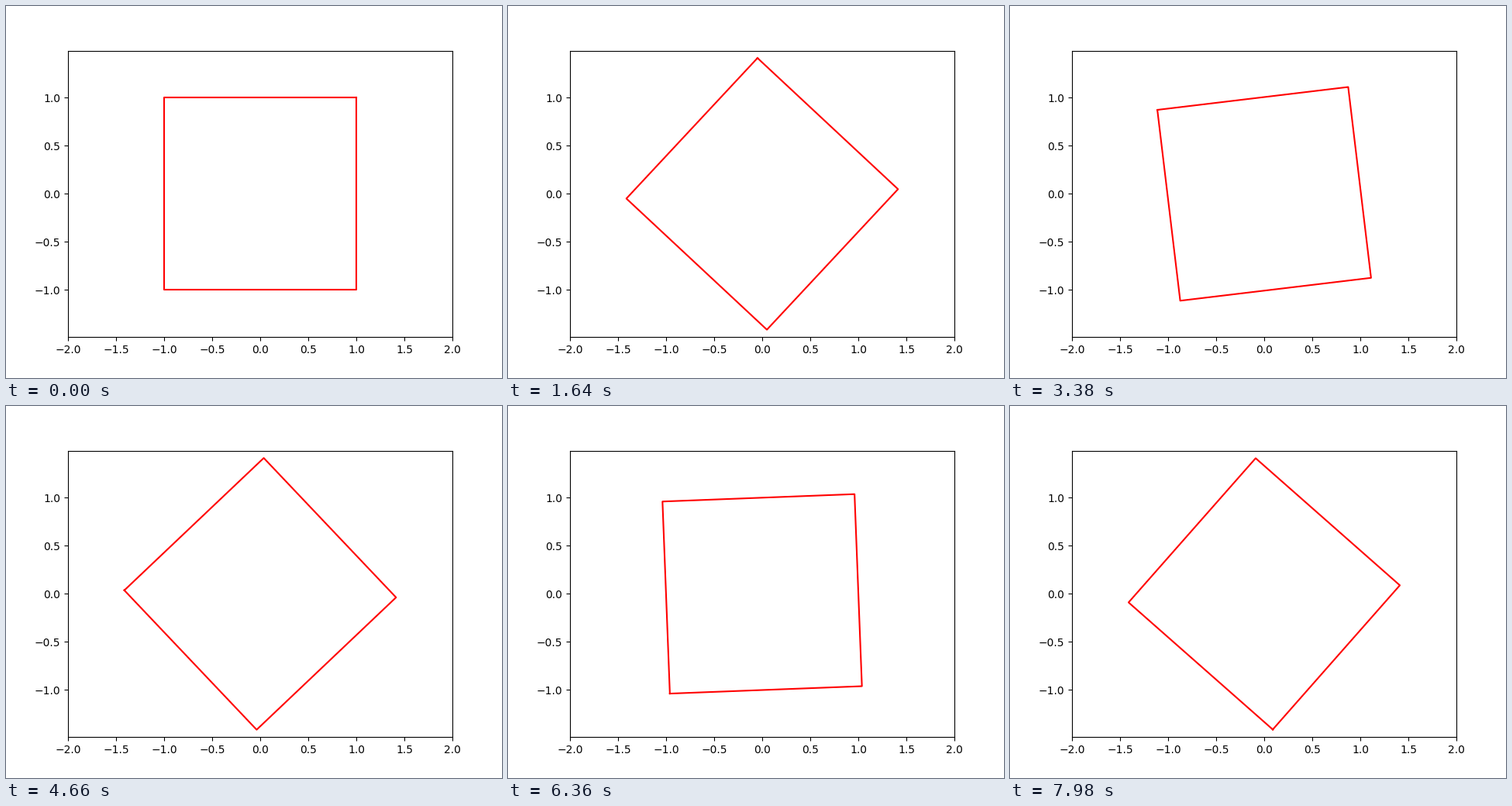
These frames come from a looping animation (640 px wide and 480 px high, 8000 ms). A matplotlib script:

```python
import numpy as np
import matplotlib.pyplot as plt
from matplotlib.animation import FuncAnimation

FRAMES = 400
INTERVAL = 20   # ms
STEP = 0.01     # radians turned per frame

corners = np.array([[1, -1, -1, 1, 1],
                    [1, 1, -1, -1, 1]], dtype=float)

fig, ax = plt.subplots(figsize=(6.4, 4.8), dpi=100)
line, = ax.plot(*corners, color="red", lw=1.5)

# Equal scale on both axes: the y range follows from the box shape.
box = ax.get_position()
half_height = 2 * (box.height * 4.8) / (box.width * 6.4)
ax.set_xlim(-2, 2)
ax.set_ylim(-half_height, half_height)
ax.set_yticks(np.arange(-1, 1.1, 0.5))


def rotation(angle):
    c, s = np.cos(angle), np.sin(angle)
    return np.array([[c, -s], [s, c]])


def update(frame):
    line.set_data(*(rotation(frame * STEP) @ corners))
    return line,


anim = FuncAnimation(fig, update, frames=FRAMES, interval=INTERVAL,
                     repeat=True, repeat_delay=0)
plt.show()
```
